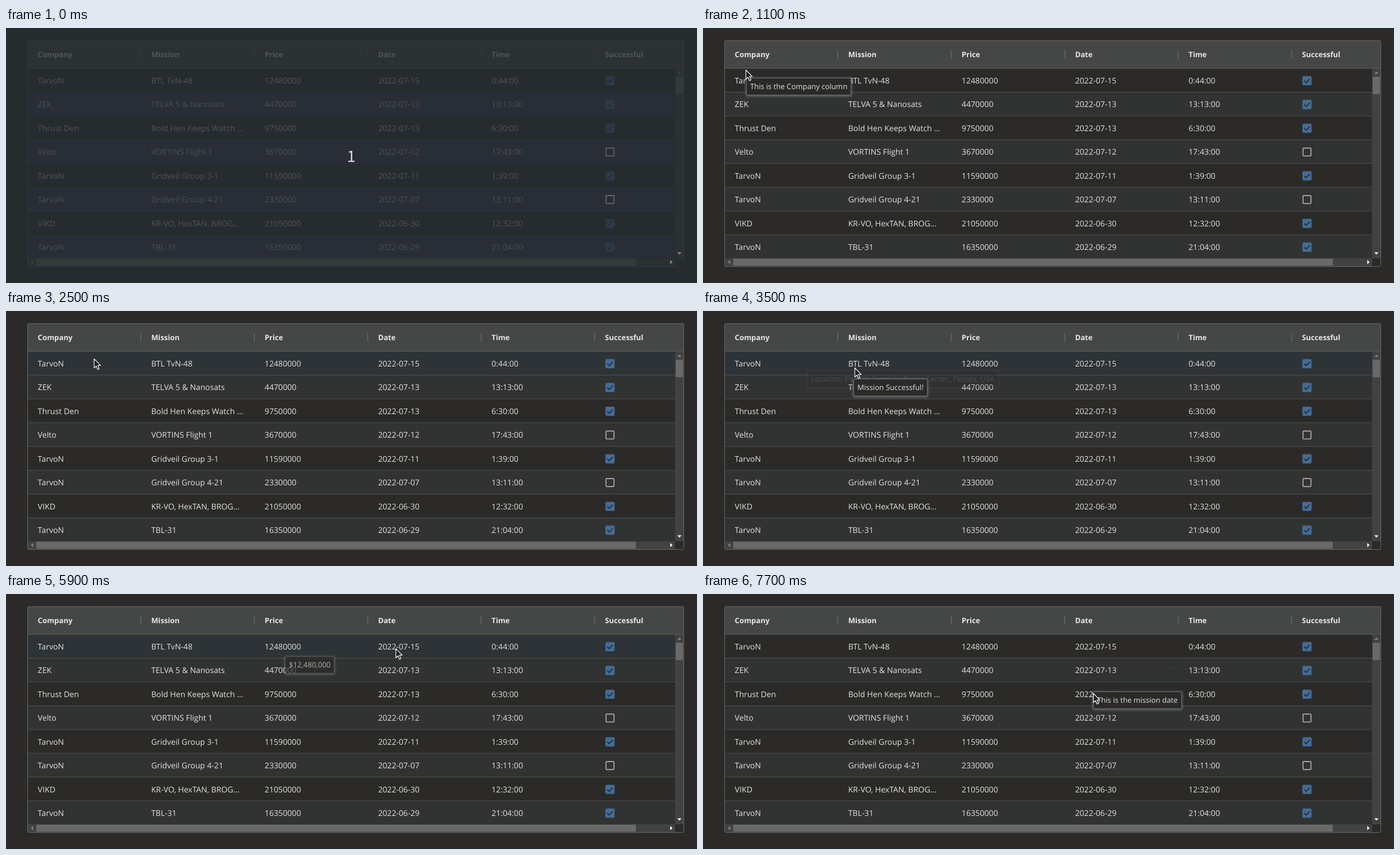
These frames come from a looping animation (1231x455 px, 8 s). An HTML page:

```html
<!DOCTYPE html>
<html lang="en">
<head>
<meta charset="utf-8">
<title>Mission table</title>
<style>
  html, body { margin: 0; width: 100%; height: 100%; overflow: hidden; background: #2b2a28; }
  body { position: relative; font-family: "Open Sans", "Noto Sans", sans-serif; text-rendering: geometricPrecision; }
  svg { position: absolute; left: 0; top: 0; display: block; }
  .head { font-size: 13.2px; font-weight: 700; fill: #e6e6e5; }
  .cell { font-size: 14.15px; fill: #e2e2e1; }
  .count { font: 28px "Noto Sans CJK JP", "Noto Sans CJK SC", "DejaVu Sans", sans-serif; fill: #d8dada; text-anchor: middle; }
  .tip {
    position: absolute; box-sizing: border-box; height: 31px; padding: 0 6px;
    font-size: 13.2px; line-height: 29px; white-space: pre; color: #e2e2e1;
    background: #2b2a28; border: 1px solid #696a69; border-radius: 2px;
    box-shadow: 0 1px 4px 1px rgba(186, 191, 199, .4);
  }
</style>
</head>
<body>
<svg id="table" width="1231" height="455"></svg>
<div id="tips"></div>
<svg width="1231" height="455">
  <path id="cursor" d="M0 0V16.2L3.8 12.7 6.4 18.9 9.1 17.8 6.5 11.7H11.4Z"
        fill="#1f1f1f" stroke="#f4f4f4" stroke-width="1.2" stroke-linejoin="round"/>
</svg>
<script>
const LOOP = 8000, STEP = 100, COL = 202.1, ROW = 42.43, TOP = 72;
const heads = ['Company', 'Mission', 'Price', 'Date', 'Time', 'Successful'];
const rows = [
  ['TarvoN', 'BTL TvN-48', '12480000', '2022-07-15', '0:44:00', true],
  ['ZEK', 'TELVA 5 & Nanosats', '4470000', '2022-07-13', '13:13:00', true],
  ['Thrust Den', 'Bold Hen Keeps Watch …', '9750000', '2022-07-13', '6:30:00', true],
  ['Velto', 'VORTINS Flight 1', '3670000', '2022-07-12', '17:43:00', false],
  ['TarvoN', 'Gridveil Group 3-1', '11590000', '2022-07-11', '1:39:00', true],
  ['TarvoN', 'Gridveil Group 4-21', '2330000', '2022-07-07', '13:11:00', false],
  ['VIKD', 'KR-VO, HexTAN, BROG…', '21050000', '2022-06-30', '12:32:00', true],
  ['TarvoN', 'TBL-31', '16350000', '2022-06-29', '21:04:00', true]
];
const place = 'Location: PX-52B, Tendoby Space Center, Florida, USA';

// Each tip pops up at `show` and fades for one second from `hide`.
const tips = [
  { text: 'This is the Company column', x: 77, y: 89, show: 1000, hide: 1130 },
  { text: place, x: 77, y: 107, show: 1400, hide: 1500 },
  { text: place, x: 186, y: 106, show: 2800, hide: 2950 },
  { text: 'Mission Successful!', x: 268, y: 121, show: 3400, hide: 4450 },
  { text: '$12,480,000', x: 497, y: 111, show: 4800, hide: 5700 },
  { text: 'This is the mission date', x: 695, y: 116, show: 6200, hide: 6900 },
  { text: 'This is the mission date', x: 695, y: 174, show: 7300, hide: LOOP }
];
// Pointer stops: time, x, y
const path = [
  [900, 64, 28], [1000, 76, 70], [1400, 77.5, 90], [2200, 77.5, 90], [2500, 157, 85.5],
  [2700, 185, 89], [2800, 187, 90], [3100, 267, 101], [3500, 270.5, 101.5], [3600, 270.5, 101.5],
  [4500, 497, 92], [5400, 497, 92], [5900, 694.5, 97.5], [6100, 695, 98], [6700, 695, 98],
  [7200, 695, 157], [7500, 695.5, 177.5], [LOOP, 695.5, 177.5]
];

const $ = id => document.getElementById(id);
const esc = s => s.replace('&', '&amp;');
const rect = (x, y, w, h, fill, more = '') =>
  `<rect x="${x}" y="${y}" width="${w}" height="${h}" fill="${fill}" ${more}/>`;
const text = (x, y, cls, s) => `<text x="${x}" y="${y}" class="${cls}">${esc(s)}</text>`;
const shape = (d, fill) => `<path d="${d}" fill="${fill}"/>`;
const colX = i => 56.6 + COL * i;
const rowY = r => TOP + ROW * r;
const rowHeight = r => Math.min(ROW, 411 - rowY(r));

function checkbox(y, on) {
  return on
    ? rect(1067.8, y - 8.2, 16.4, 16.4, '#436c96', 'rx="2.2"') +
      `<path d="M1071.2 ${y + .2}l3.3 3.3 6.4-6.6" fill="none" stroke="#2b2a28" stroke-width="1.8"/>`
    : rect(1068.9, y - 7.1, 14.2, 14.2, 'none', 'rx="1.4" stroke="#a3a3a1" stroke-width="1.9"');
}

function buildTable() {
  let body = '', boxes = '';
  rows.forEach((row, r) => {
    const mid = 94 + ROW * r;
    body += rect(39, rowY(r), 1153, rowHeight(r), r % 2 ? '#313332' : '#2b2a28', r ? '' : 'id="hover"');
    if (r) body += rect(39, rowY(r) - .5, 1153, 1, '#505251');
    row.slice(0, 5).forEach((value, c) => {
      body += text(colX(c), mid + 5, 'cell', value);
    });
    if (row[5]) body += checkbox(mid, true);
    else boxes += checkbox(mid, false);
  });
  const header = rect(38.5, 22, 1169, 49.5, '#454746', 'rx="2.5"') +
    heads.map((h, i) => text(colX(i), 51.9, 'head', h) +
      (i ? rect(37.1 + COL * i, 39.8, 2, 14.6, '#5f6160') : '')).join('') +
    rect(38, 71.3, 1170, 1, '#686a69');
  const bars = rect(1192, 72, 15.5, 339, '#424242') + rect(1193, 87, 13, 31, '#696969') +
    rect(39, 411, 1153, 14.5, '#424242') + rect(54, 411.5, 1068, 12.5, '#696969') +
    rect(1192, 411, 15.5, 14.5, '#2b2a28') +
    shape('M1196 81.8h7.4l-3.7-4z', '#858585') + shape('M48.4 414v7.4l-4-3.7z', '#858585');
  const arrows = shape('M1196 400.3h7.4l-3.7 4z', '#fff') + shape('M1183.4 414v7.4l4-3.7z', '#fff');
  const frame = rect(38.5, 22.5, 1169, 403, 'none', 'rx="2.5" stroke="#686a69"');
  const tint = rows.map((_, r) =>
    r % 2 ? rect(39, rowY(r), 1153, rowHeight(r), '#34345a', 'opacity=".11"') : '').join('');
  $('table').innerHTML = body + header + bars + frame +
    '<g id="shade">' + rect(0, 0, 1231, 455, '#262c30', 'opacity=".78"') + tint +
    text(615, 239, 'count', '1') + '</g>' +
    `<g id="bright">${boxes}${arrows}</g>`;
}

function buildTips() {
  for (const tip of tips) {
    tip.el = document.createElement('div');
    tip.el.className = 'tip';
    tip.el.textContent = tip.text;
    tip.el.style.left = tip.x + 'px';
    tip.el.style.top = tip.y + 'px';
    $('tips').append(tip.el);
  }
}

// The standard "ease" curve, cubic-bezier(.25, .1, .25, 1)
function ease(p) {
  if (p <= 0) return 0;
  if (p >= 1) return 1;
  const bez = (a, b, u) => 3 * a * u * (1 - u) ** 2 + 3 * b * u * u * (1 - u) + u ** 3;
  let lo = 0, hi = 1;
  for (let i = 0; i < 20; i++) {
    const u = (lo + hi) / 2;
    if (bez(.25, .25, u) < p) lo = u; else hi = u;
  }
  return bez(.1, 1, lo);
}

function pointerAt(t) {
  const i = Math.max(1, path.findIndex(k => k[0] > t));
  const [t0, x0, y0] = path[i - 1], [t1, x1, y1] = path[i];
  const p = (t - t0) / (t1 - t0);
  return [x0 + (x1 - x0) * p, y0 + (y1 - y0) * p];
}

function render(ms) {
  const t = Math.floor(ms % LOOP / STEP) * STEP;
  const shaded = t < 100;
  $('shade').style.display = shaded ? '' : 'none';
  $('bright').style.opacity = shaded ? .45 : 1;
  $('hover').setAttribute('fill', t >= 2300 && t < 6900 ? '#2d3336' : '#2b2a28');
  for (const { el, show, hide } of tips) {
    const opacity = t < show ? 0 : 1 - ease((t - hide) / 1000);
    el.style.opacity = opacity;
    el.style.visibility = opacity > .005 ? 'visible' : 'hidden';
  }
  const cursor = $('cursor');
  cursor.style.display = t < path[0][0] ? 'none' : '';
  if (t >= path[0][0]) cursor.setAttribute('transform', `translate(${pointerAt(t)})`);
}

buildTable();
buildTips();
const start = performance.now();
function tick() {
  render(performance.now() - start);
  requestAnimationFrame(tick);
}
tick();
</script>
</body>
</html>
```
